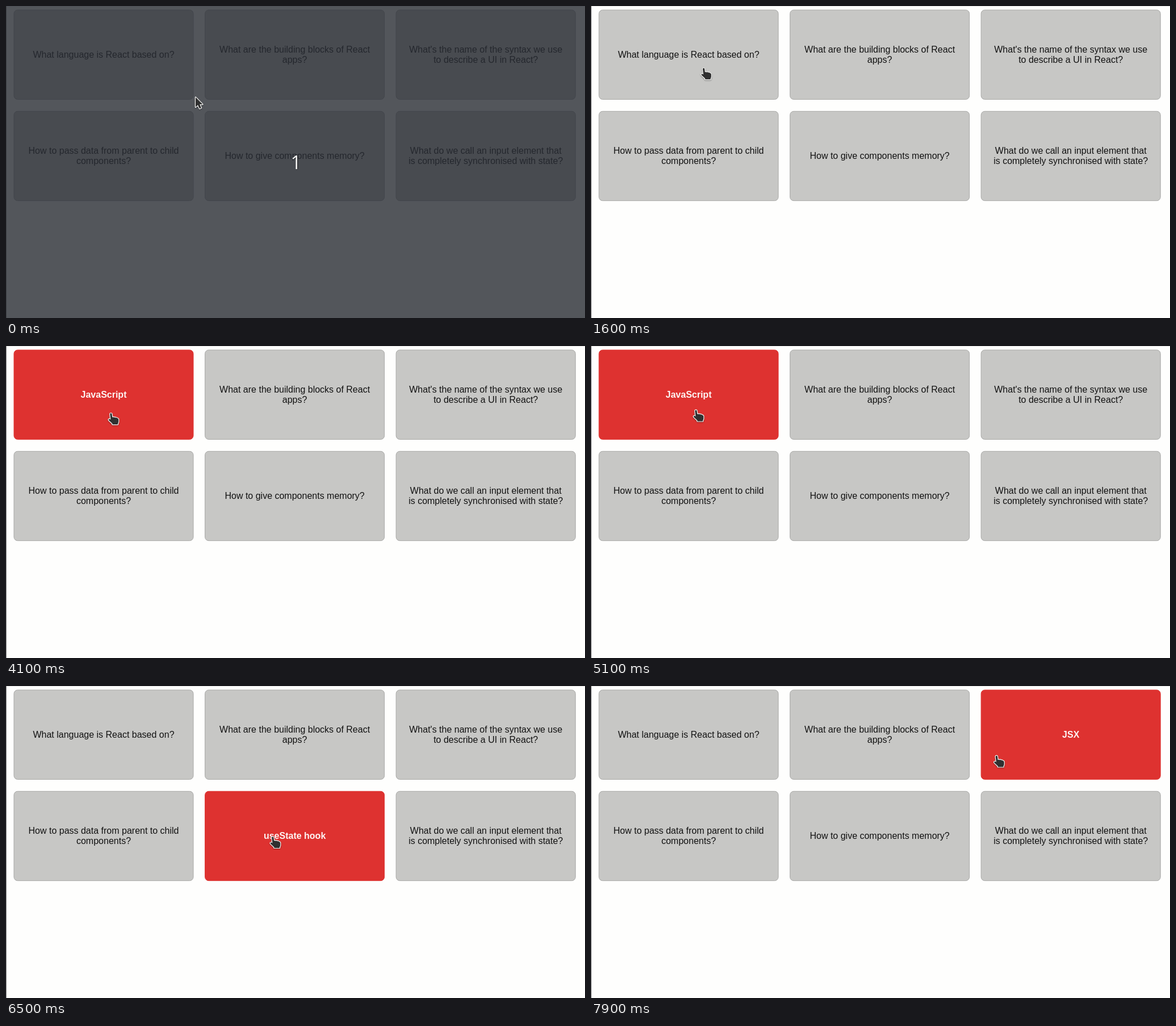
An HTML page with a canvas for the animation above (8000 ms loop, 1020 by 549 pixels).

```html
<!DOCTYPE html>
<html lang="en">
<head>
<meta charset="utf-8">
<title>Flash cards</title>
<style>
  html, body { margin: 0; width: 100%; height: 100%; overflow: hidden; background: #fefefd; }
  canvas { display: block; }
</style>
</head>
<body>
<canvas id="stage" width="1020" height="549"></canvas>
<script>
const ctx = document.getElementById('stage').getContext('2d');
const W = 1020, H = 549, LOOP = 8000, STEP = 100;
const CARD = { x: 14, y: 7, w: 316, h: 157.3, dx: 336.6, dy: 178.3, r: 6.5 };
const FONT = '16px "Liberation Sans", Arial, sans-serif';

// open: time span in which the answer shows
const cards = [
  { q: ['What language is React based on?'], a: 'JavaScript', open: [2600, 5400] },
  { q: ['What are the building blocks of React', 'apps?'] },
  { q: ["What's the name of the syntax we use", 'to describe a UI in React?'], a: 'JSX', open: [7900, 8000] },
  { q: ['How to pass data from parent to child', 'components?'] },
  { q: ['How to give components memory?'], a: 'useState hook', open: [6500, 7900] },
  { q: ['What do we call an input element that', 'is completely synchronised with state?'] }
].map((card, i) => ({
  ...card,
  x: CARD.x + (i % 3) * CARD.dx,
  y: CARD.y + Math.floor(i / 3) * CARD.dy
}));

// pointer hot spot: time, x, y
const path = [
  [900, 334, 160], [1500, 202, 108], [1800, 189, 114], [1900, 187, 113],
  [4000, 187, 113], [4500, 168, 166.5],
  [4800, 168, 166.5], [5100, 185, 113],
  [5700, 185, 113], [6100, 470, 265.5],
  [6800, 470, 265.5], [7400, 714.5, 123]
];

const arrow = new Path2D('M0 0.5V18L4 14.2L7 20.6L10 19.2L7.2 13H12.4Z');
const hand = new Path2D(
  'M-1.8 1.2Q-1.6 -0.2 -0.2 -0.2Q1.3 -0.2 1.5 1.2L2.2 7Q3.8 5.8 5.2 7.2' +
  'Q7 6.2 8.4 7.8Q10.2 7 11.2 8.8Q13.2 8.6 13.2 11V14.5Q13.2 16.4 12 18V19.4H2.4' +
  'V18L-3.8 12.2Q-4.8 10.8 -3.6 10Q-2.4 9.4 -0.6 11Z');

function pointerAt(t) {
  const next = path.findIndex(p => p[0] > t);
  if (next === 0) return path[0].slice(1);
  if (next < 0) return path[path.length - 1].slice(1);
  const [t0, x0, y0] = path[next - 1];
  const [t1, x1, y1] = path[next];
  const u = (t - t0) / (t1 - t0);
  const e = u * u * (3 - 2 * u);
  return [x0 + (x1 - x0) * e, y0 + (y1 - y0) * e];
}

function drawCard(card, t) {
  const flipped = card.open && t >= card.open[0] && t < card.open[1];
  const lines = flipped ? [card.a] : card.q;
  ctx.beginPath();
  ctx.roundRect(card.x, card.y, CARD.w, CARD.h, CARD.r);
  ctx.fillStyle = flipped ? '#de3230' : '#c7c7c5';
  ctx.strokeStyle = flipped ? '#de3230' : '#a8a8a6';
  ctx.lineWidth = 1;
  ctx.fill();
  ctx.stroke();

  ctx.font = (flipped ? 'bold ' : '') + FONT;
  ctx.fillStyle = flipped ? '#fdf4f3' : '#121212';
  const base = Math.round(card.y + CARD.h / 2 + 5.5 - (lines.length - 1) * 9);
  lines.forEach((line, i) => ctx.fillText(line, card.x + CARD.w / 2, base + i * 18));
}

function drawCountdown() {
  ctx.fillStyle = 'rgba(40,44,52,0.8)';
  ctx.fillRect(0, 0, W, H);
  ctx.save();
  ctx.font = '33px "Open Sans", "Noto Sans", sans-serif';
  ctx.shadowColor = 'rgba(20,20,20,0.7)';
  ctx.shadowOffsetX = 1;
  ctx.shadowBlur = 2;
  ctx.fillStyle = '#f2f2f0';
  ctx.fillText('1', 511, 287);
  ctx.restore();
}

function drawPointer(x, y) {
  const over = cards.some(c => x >= c.x && x <= c.x + CARD.w && y >= c.y && y <= c.y + CARD.h);
  const shape = over ? hand : arrow;
  ctx.save();
  ctx.translate(x, y);
  ctx.lineJoin = 'round';
  ctx.lineWidth = 2.4;
  ctx.strokeStyle = '#f8f8f6';
  ctx.shadowColor = 'rgba(0,0,0,0.4)';
  ctx.shadowBlur = 2;
  ctx.shadowOffsetY = 1;
  ctx.stroke(shape);
  ctx.shadowColor = 'transparent';
  ctx.fillStyle = '#303030';
  ctx.fill(shape);
  ctx.restore();
}

function draw(t) {
  ctx.fillStyle = '#fefefd';
  ctx.fillRect(0, 0, W, H);
  ctx.fillStyle = '#e6e6e5';
  ctx.fillRect(0, 0, W, 1);
  ctx.fillStyle = '#888';
  ctx.fillRect(0, 0, 1, H);
  ctx.textAlign = 'center';
  cards.forEach(card => drawCard(card, t));
  if (t < STEP) drawCountdown();
  drawPointer(...pointerAt(t));
}

const start = performance.now();
function tick() {
  const t = (performance.now() - start) % LOOP;
  draw(Math.floor(t / STEP) * STEP);
  requestAnimationFrame(tick);
}
tick();
</script>
</body>
</html>
```
